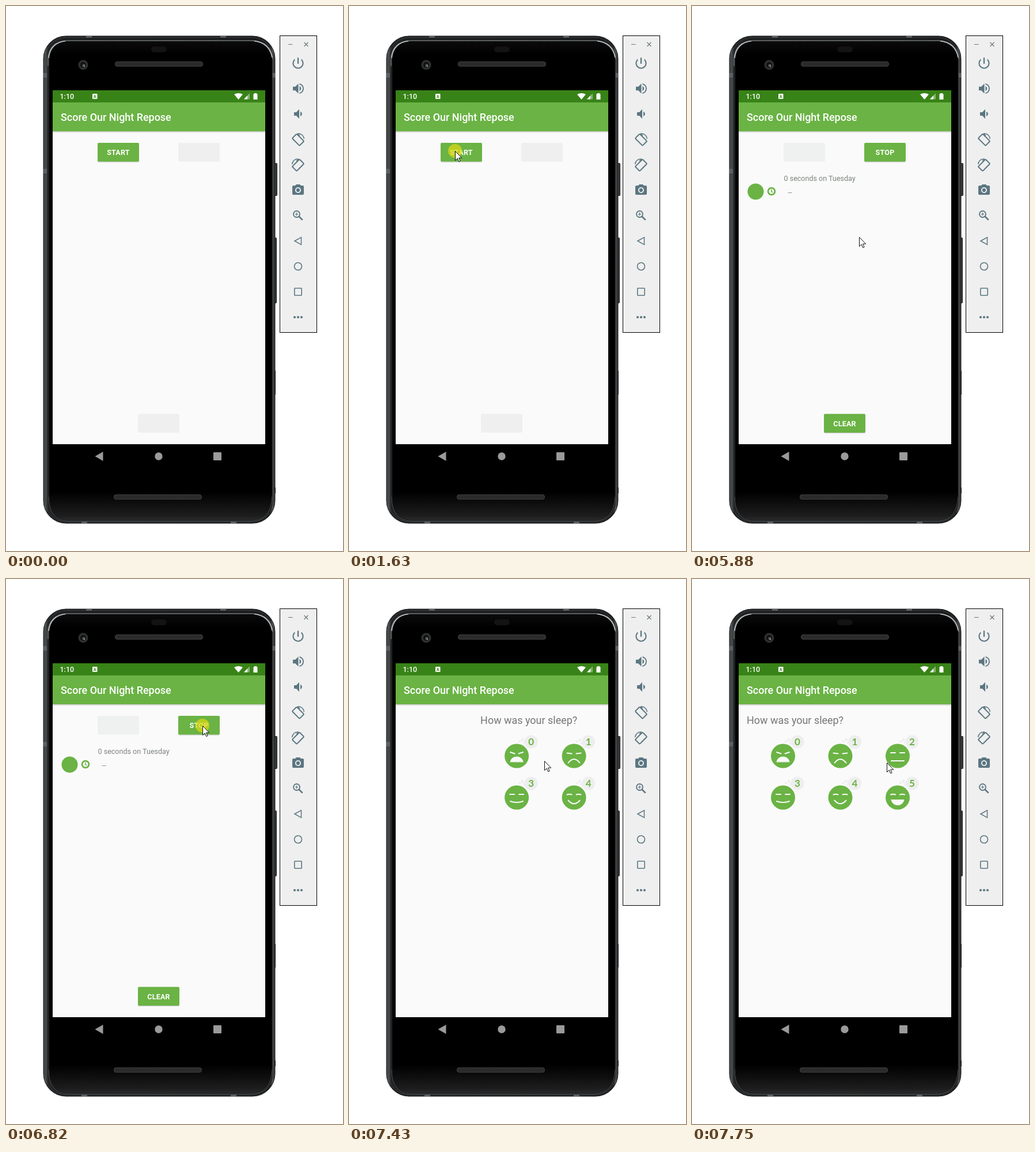
An HTML page for the animation above (8 s loop, 585 by 944 pixels).

```html
<!DOCTYPE html>
<html lang="en">
<head>
<meta charset="utf-8">
<title>Sleep tracker demo</title>
<style>
  html, body { margin: 0; width: 100%; height: 100%; overflow: hidden; background: #fff; }
  svg { display: block; width: 585px; height: 944px; font-family: Roboto, "Open Sans", sans-serif; }
  .label { font-size: 12.56px; font-weight: 700; letter-spacing: .2px; text-anchor: middle; }
  .line { fill: none; stroke: #5b7681; stroke-width: 1.8; }
  .face { fill: none; stroke: #fafafa; stroke-width: 2; stroke-linecap: round; }
  .badge { font: 700 17px Lato, "Open Sans", sans-serif; text-anchor: middle; fill: #6ab344; }
</style>
</head>
<body>
<svg viewBox="0 0 585 944" xmlns="http://www.w3.org/2000/svg">
  <defs>
    <linearGradient id="edge" x2="1" y2="0">
      <stop offset="0" stop-color="#2c2f30"/><stop offset=".008" stop-color="#5a5d5e"/>
      <stop offset=".02" stop-color="#202223"/><stop offset=".98" stop-color="#1b1c1d"/>
      <stop offset=".99" stop-color="#55585a"/><stop offset="1" stop-color="#222"/>
    </linearGradient>
    <linearGradient id="glass" x2="0" y2="1">
      <stop offset="0" stop-color="#0c0c0c"/><stop offset=".03" stop-color="#000"/>
      <stop offset=".94" stop-color="#000"/><stop offset=".99" stop-color="#1d1d1d"/>
      <stop offset="1" stop-color="#2a2a2a"/>
    </linearGradient>
    <linearGradient id="shade" x2="0" y2="1">
      <stop offset="0" stop-color="#c4c8c2"/><stop offset="1" stop-color="#fafafa"/>
    </linearGradient>
    <pattern id="mesh" width="3" height="3" patternUnits="userSpaceOnUse">
      <path d="M0 3L3 0" stroke="#484848" stroke-width=".8"/>
    </pattern>
    <clipPath id="page"><rect x="81" y="217" width="369" height="542"/></clipPath>
  </defs>

  <!-- phone -->
  <g fill="#3a3d3e" stroke="#1c1d1e">
    <rect x="464.5" y="272.5" width="6" height="56" rx="1"/>
    <rect x="464.5" y="401.5" width="5" height="113" rx="1"/>
    <rect x="464.5" y="632.5" width="3" height="40"/>
    <rect x="464.5" y="834.5" width="3" height="9"/>
  </g>
  <rect x="65" y="52" width="402" height="844" rx="39" fill="url(#edge)" stroke="#222526"/>
  <rect x="68.5" y="54.5" width="395" height="839" rx="36" fill="none" stroke="#3b3e3f"/>
  <g fill="#5c6062">
    <rect x="65" y="116" width="6" height="8"/><rect x="65" y="282" width="6" height="8"/>
    <rect x="461" y="116" width="6" height="8"/>
    <rect x="139" y="52" width="10" height="3"/><rect x="372" y="52" width="10" height="3"/>
    <rect x="131" y="893" width="10" height="3"/><rect x="390" y="893" width="10" height="3"/>
  </g>
  <rect x="75" y="59" width="387" height="832" rx="33" fill="url(#glass)" stroke="#161718"/>
  <path d="M73 104V92Q74 62 107 60H428Q460 62 463 92" fill="none" stroke="#777b7d" stroke-width="1.3"/>
  <path d="M74 90Q77 64 103 60.500M431 60.500Q457 64 462 89" fill="none" stroke="#c4c8ca" stroke-width="1.5"/>
  <path d="M74 850Q74 891 108 892H427Q460 891 462 850" fill="none" stroke="#484b4c"/>
  <rect x="252" y="70" width="27" height="10" rx="5" fill="#131313"/>
  <circle cx="134" cy="102" r="8.500" fill="#2e3031"/><circle cx="134" cy="102" r="5" fill="#111"/>
  <circle cx="135" cy="103" r="2.500" fill="#565a5c"/><circle cx="136" cy="104.500" r="1" fill="#aaa"/>
  <g id="speakers"></g>
  <g fill="#9a9a9a">
    <path d="M154.500 780L168.500 772V788Z"/><circle cx="265" cy="780" r="6.700"/>
    <rect x="360" y="773" width="14" height="14" rx="1"/>
  </g>

  <!-- screen -->
  <rect x="81" y="146" width="369" height="613" fill="#fafafa"/>
  <rect x="81" y="146" width="369" height="21" fill="#388317"/>
  <rect x="81" y="167" width="369" height="50" fill="#6ab344"/>
  <rect x="81" y="217" width="369" height="3" fill="url(#shade)"/>
  <g fill="#fff">
    <text x="93.500" y="161" font-size="12.500" font-weight="500">1:10</text>
    <rect x="150" y="152" width="8.500" height="9" rx="1"/>
    <path d="M396 153Q403.500 149 411 153L403.500 162Z"/>
    <path d="M413 161.500L423 151V161.500Z" opacity=".4"/><path d="M413 161.500L419 155.200V161.500Z"/>
    <path d="M431 151h4v1.300h1.500v9.700h-7v-9.700h1.500z"/>
    <text x="95" y="199" font-size="17.950" font-weight="500">Score Our Night Repose</text>
  </g>
  <path d="M152.300 159.500L154.250 154L156.200 159.500M153 157.800H155.500" fill="none" stroke="#388317"/>

  <g clip-path="url(#page)">
    <g id="home">
      <g id="start"></g><g id="stop"></g><g id="clear"></g>
      <g id="entry">
        <text x="159.500" y="303" font-size="12.560" fill="#7d857d">0 seconds on Tuesday</text>
        <text x="166.500" y="327" font-size="12.560" fill="#7d857d">--</text>
        <circle cx="110.500" cy="321.500" r="14" fill="#6ab344"/>
        <circle cx="138" cy="321" r="5.900" fill="none" stroke="#6ab344" stroke-width="2.700"/>
        <path d="M137.800 317.500V321.300L140.300 322.800" fill="none" stroke="#6ab344" stroke-width="1.500"/>
      </g>
    </g>
    <g id="rating">
      <text x="95" y="251" font-size="17.950" fill="#757575">How was your sleep?</text>
      <g id="faces"></g>
    </g>
  </g>

  <!-- emulator toolbar -->
  <rect x="475.500" y="51.500" width="64" height="514" fill="#efefef" stroke="#000"/>
  <path d="M490 66.500H497.500M517.500 63L524.500 70M524.500 63L517.500 70" fill="none" stroke="#6b7880" stroke-width="1.200"/>
  <g class="line">
    <path d="M507 89.500V100" stroke-width="2.300"/>
    <path d="M501.300 92.700A8.600 8.600 0 1 0 512.700 92.700" stroke-width="2.100"/>
    <g id="turn">
      <rect x="498" y="226.200" width="18" height="11" rx="1.500" transform="rotate(45 507 231.700)" stroke-width="2"/>
      <path d="M506 221Q515.500 220.500 517.500 230M506 221L510 224.500" stroke-width="1.500"/>
    </g>
    <use href="#turn" transform="matrix(-1 0 0 1 1014 44)"/>
    <circle cx="504.500" cy="360.500" r="5.500"/>
    <path d="M508.500 364.500L514.700 370.700" stroke-width="2.600"/>
    <path d="M501.700 360.500H507.300M504.500 357.700V363.300" stroke-width="1.200"/>
    <path d="M501 407L512.500 400.700V413.300Z" stroke-width="1.500"/>
    <circle cx="507" cy="451" r="6.500" stroke-width="1.600"/>
    <rect x="500.800" y="488.800" width="12.400" height="12.400" rx="1" stroke-width="1.600"/>
  </g>
  <g fill="#5b7681">
    <path id="cone" d="M498 139.800V146.200H502.200L507.500 151.500V134.500L502.200 139.800Z"/>
    <path d="M509.500 138.700Q512.300 140.200 512.300 143T509.500 147.300Z"/>
    <path d="M500 184V190H504L509 195.200V178.800L504 184Z"/>
    <path d="M511 182.700Q513.900 184.200 513.900 187T511 191.300Z"/>
    <path d="M504 309L502.200 311H499Q497 311 497 313V325Q497 327 499 327H515Q517 327 517 325V313Q517 311 515 311H511.800L510 309Z"/>
    <circle cx="501" cy="539" r="2.100"/><circle cx="507" cy="539" r="2.100"/><circle cx="513" cy="539" r="2.100"/>
  </g>
  <path class="line" d="M509.500 134.800Q516 137 516 143T509.500 151.200"/>
  <circle cx="507" cy="319" r="4.100" fill="#5b7681" stroke="#efefef" stroke-width="1.900"/>

  <circle id="tap" r="12" fill="#dcd812" opacity=".72"/>
  <path id="cursor" d="M.5.5V16.500L4.200 13 6.700 18.700 9.100 17.600 6.600 12.100H11.700Z" fill="#fff" stroke="#111" stroke-linejoin="round"/>
</svg>
<script>
const $ = id => document.getElementById(id);
const GREEN = '#6ab344', LOOP = 8000;

// Static parts
$('speakers').innerHTML = [[189, 96], [187, 846]].map(([x, y]) =>
  ['#202020', 'url(#mesh)'].map(fill =>
    `<rect x="${x + .5}" y="${y + .5}" width="152" height="8" rx="4" fill="${fill}" stroke="#3c3c3c"/>`).join('')
).join('');

function makeButton(id, x, y, label) {
  const rect = (dy, extra) => `<rect x="${x}" y="${y + dy}" width="72" height="32.500" rx="2" ${extra}/>`;
  $(id).innerHTML = rect(1.2, 'fill="#000" opacity=".18"') + rect(0, '') +
    `<text class="label" x="${x + 36}" y="${y + 21}">${label}</text>`;
  const [shadow, body, text] = $(id).children;
  return (fill, ink) => {
    shadow.style.display = fill === GREEN ? '' : 'none';
    body.setAttribute('fill', fill);
    text.setAttribute('fill', ink);
  };
}
const start = makeButton('start', 159, 237, 'START');
const stop = makeButton('stop', 299, 237, 'STOP');
const clear = makeButton('clear', 229, 706.5, 'CLEAR');

const flatEyes = 'M-12-5.500H-4M4-5.500H12';
const softEyes = 'M-12-5Q-8-6.500-4-5M4-5Q8-6.500 12-5';
const moods = [
  ['M-11-6.500L-3.500-4M3.500-4L11-6.500', 'M-11 10Q-9 1.500 0 1.500T11 10Z', 1],
  ['M-12-5L-4-4M4-4L12-5', 'M-10 12Q0-1 10 12'],
  [flatEyes, 'M-11 8.500H11'],
  [flatEyes, 'M-11 6.500Q0 10.500 11 6.500'],
  [softEyes, 'M-10 5Q0 16.500 10 5'],
  [softEyes, 'M-11 4H11Q9 13 0 13T-11 4Z', 1]
];
$('faces').innerHTML = moods.map(([eyes, mouth, open], i) =>
  `<g transform="translate(${158 + i % 3 * 99.5} ${306.5 + (i > 2) * 72})">
    <g fill="#eee"><circle cx="25" cy="-24.500" r="11.500"/><circle cx="5" cy="-25" r="2"/>
      <circle cx="10" cy="-28" r="2.500"/><circle cx="13" cy="-23" r="2"/></g>
    <circle r="21" fill="${GREEN}"/>
    <path class="face" stroke-width="1.500" d="${eyes}"/>
    <path class="face" d="${mouth}"${open ? ' style="fill:#fafafa;stroke-width:1"' : ''}/>
    <text class="badge" x="25" y="-18.500">${i}</text>
  </g>`).join('');

// Pointer: time, x, y; each place is held until the next
const pointer = [
  [130, 498, 925], [207, 452, 805], [283, 386, 650], [360, 314, 500],
  [437, 256, 388], [513, 220, 320], [590, 209, 296],
  [760, 201, 282], [835, 190, 262], [910, 184, 251],
  [1770, 196, 271], [1850, 227, 318], [1930, 260, 364], [2000, 282, 395], [2080, 288, 403],
  [5880, 290, 400], [5957, 295, 387], [6033, 304, 355], [6110, 316, 311], [6187, 327, 268],
  [6263, 334, 241], [6340, 338, 231], [6417, 340, 239], [6493, 341, 249], [6570, 341, 254],
  [7050, 341, 259], [7130, 341, 272], [7200, 340, 289], [7280, 340, 303], [7350, 339, 312],
  [7430, 339, 315], [7660, 338, 318]
];
const slideTimes = [7050, 7130, 7200, 7280, 7350, 7430, 7510, 7600, 7660, 7750];
const SLIDE_FROM = 7023, SLIDE_MS = 690, WIDTH = 369;

const last = (list, test) => list.filter(test).pop();
const show = (id, on) => { $(id).style.display = on ? '' : 'none'; };
const move = (id, x, y) => $(id).setAttribute('transform', `translate(${x} ${y})`);

function draw(t) {
  const running = t >= 2460;
  if (!running) start(GREEN, '#fff');
  else if (t < 2540) start('#dce3d8', '#eceeeb');
  else if (t < 5880) start('#e9eae9', '#dfe1df');
  else start('#eff0f0', '#eff0f0');
  for (const paint of [stop, clear])
    running ? paint(GREEN, '#fff') : paint('#efefef', '#efefef');
  show('entry', running);
  $('entry').setAttribute('opacity', t < 2540 ? .5 : 1);

  const slide = last(slideTimes, s => s <= t);
  show('home', !slide);
  show('rating', slide);
  if (slide) {
    const p = Math.min(1, (slide - SLIDE_FROM) / SLIDE_MS);
    move('rating', WIDTH * (1 + Math.cos(Math.PI * p)) / 2, 0);
  }

  const spot = last(pointer, row => row[0] <= t);
  show('cursor', spot);
  if (spot) {
    move('cursor', spot[1], spot[2]);
    move('tap', spot[1], spot[2]);
  }
  show('tap', (t >= 1630 && t < 1690) || (t >= 6820 && t < 6890));
}

function frame() {
  draw(performance.now() % LOOP);
  requestAnimationFrame(frame);
}
frame();
</script>
</body>
</html>
```
